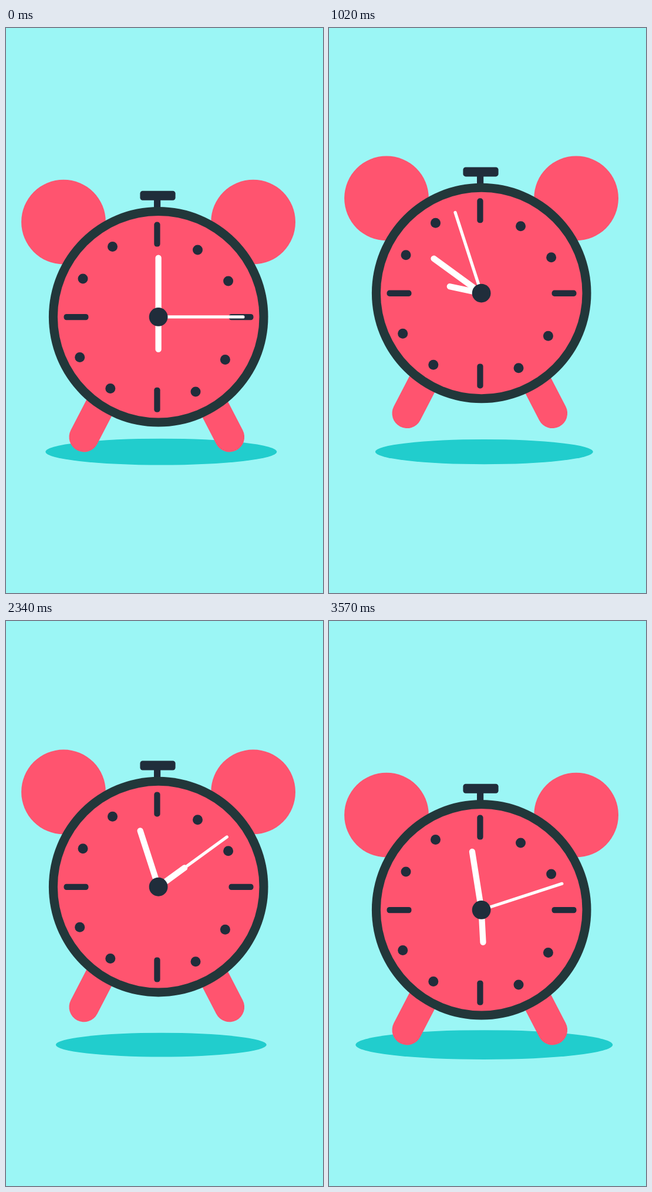
An HTML page with a canvas for the animation above (3.6 s loop, 540 px wide and 960 px high).

```html
<!DOCTYPE html>
<html lang="en">
<head>
<meta charset="utf-8">
<title>Alarm clock</title>
<style>
  html, body { margin: 0; width: 100%; height: 100%; overflow: hidden; background: #9bf6f5; }
  canvas { display: block; width: 540px; height: 960px; }
</style>
</head>
<body>
<canvas id="stage" width="540" height="960"></canvas>
<script>
const ctx = document.getElementById('stage').getContext('2d');

const STEP = 30;    // ms per tick
const TICKS = 120;  // ticks per loop
const SKY = '#9bf6f5', RED = '#ff546f', RIM = '#22373a', INK = '#202d3b', SHADE = '#21cdcd';
const PIVOT = { x: 259.6, y: 490.9 };

// [tick, value] pairs, linear in between
const HOP = [[22, 0], [31, 70.5], [38, 0], [44, 32], [48, 0]];
const SHADOW = [[22, 197], [31, 165.5], [39, 219], [44, 197], [48, 219]];
const SECOND_HOP = 51;
const twice = keys => keys.concat(keys.map(([tick, value]) => [tick + SECOND_HOP, value]));
const hopKeys = twice(HOP), shadowKeys = twice(SHADOW);

const DOTS = [
  [181.5, 371.5], [326.5, 377], [378.6, 430], [131, 426],
  [125.7, 559.5], [177.8, 612.6], [323, 618], [373.4, 563.5]
];

function valueAt(keys, tick) {
  if (tick <= keys[0][0]) return keys[0][1];
  for (let i = 1; i < keys.length; i++) {
    const [t0, v0] = keys[i - 1], [t1, v1] = keys[i];
    if (tick <= t1) return v0 + (v1 - v0) * (tick - t0) / (t1 - t0);
  }
  return keys[keys.length - 1][1];
}

function ellipse(x, y, rx, ry, color) {
  ctx.fillStyle = color;
  ctx.beginPath();
  ctx.ellipse(x, y, rx, ry, 0, 0, Math.PI * 2);
  ctx.fill();
}

const disc = (x, y, r, color) => ellipse(x, y, r, r, color);

function bar(x, y, w, h, r) {
  ctx.fillStyle = INK;
  ctx.beginPath();
  ctx.roundRect(x, y, w, h, r);
  ctx.fill();
}

function stroke(x0, y0, x1, y1, width, color) {
  ctx.strokeStyle = color;
  ctx.lineWidth = width;
  ctx.lineCap = 'round';
  ctx.beginPath();
  ctx.moveTo(x0, y0);
  ctx.lineTo(x1, y1);
  ctx.stroke();
}

// angle in degrees, clockwise from twelve o'clock
function hand(angle, length, width) {
  const a = angle * Math.PI / 180;
  stroke(PIVOT.x, PIVOT.y, PIVOT.x + length * Math.sin(a), PIVOT.y - length * Math.cos(a), width, '#fff');
}

function drawBody() {
  disc(98, 329.6, 71.9, RED);
  disc(421.1, 329.6, 71.9, RED);
  stroke(132.9, 695, 179, 606.2, 50.8, RED);
  stroke(380.7, 695, 334.6, 606.2, 50.8, RED);
  bar(252, 288, 11.2, 24, 0);
  bar(228.4, 276.7, 60.2, 16, 4.5);
  disc(259.7, 490.8, 186.8, RIM);
  disc(259.7, 490.8, 171.8, RED);
}

function drawDial() {
  bar(252.3, 329.6, 10.3, 42, 4.5);
  bar(252.3, 610.7, 10.3, 42, 4.5);
  bar(98.5, 485.9, 42, 10.3, 4.5);
  bar(379.5, 485.9, 42, 10.3, 4.5);
  for (const [x, y] of DOTS) disc(x, y, 8.5, INK);
}

function draw(tick) {
  ctx.fillStyle = SKY;
  ctx.fillRect(0, 0, 540, 960);
  const rx = valueAt(shadowKeys, tick);
  ellipse(264.3, 720.1, rx, rx * 0.114, SHADE);

  ctx.save();
  ctx.translate(0, -valueAt(hopKeys, tick));
  drawBody();
  drawDial();
  hand(180 + tick * 3, 55, 10.3);
  hand(tick * 9, 100.2, 10.3);
  hand(90 + tick * 18, 144.3, 5.2);
  disc(PIVOT.x, PIVOT.y, 15.9, INK);
  ctx.restore();
}

const start = performance.now();
function loop() {
  const elapsed = performance.now() - start;
  draw(Math.floor(elapsed / STEP + 0.01) % TICKS);
  requestAnimationFrame(loop);
}
loop();
</script>
</body>
</html>
```
